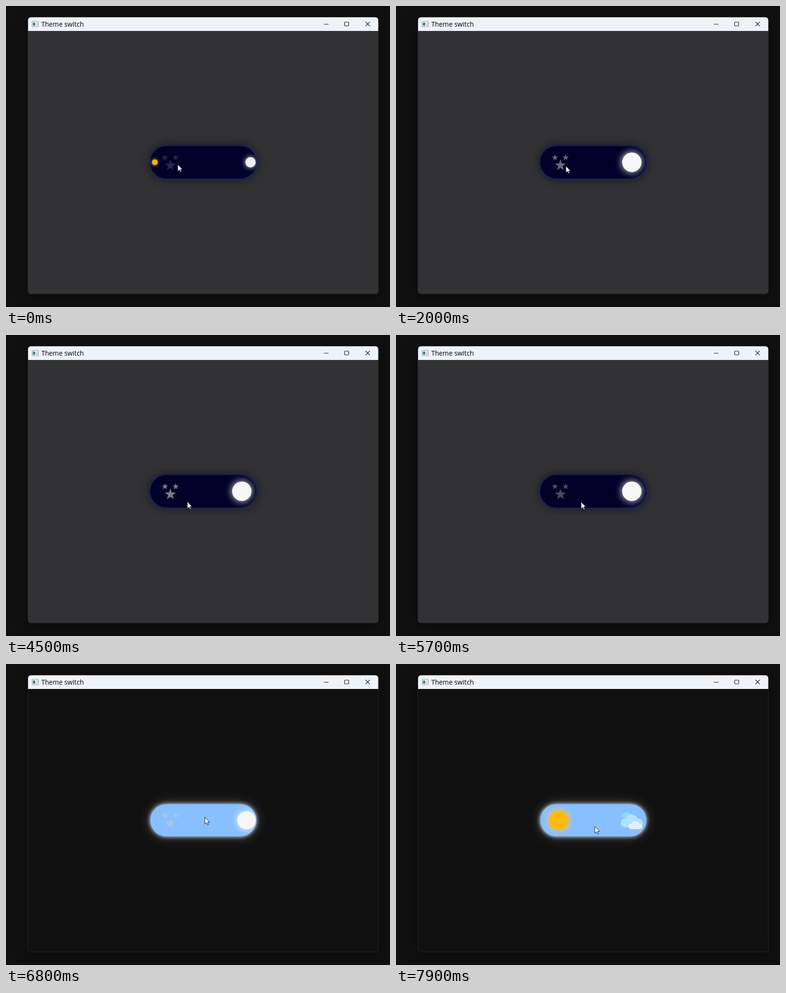
Write an HTML page with a canvas that moves like this. It is 800 px wide and 627 px high and loops after 8000 ms.

```html
<!DOCTYPE html>
<html lang="en">
<head>
<meta charset="utf-8">
<title>Theme switch</title>
<style>
  html, body { margin: 0; width: 100%; height: 100%; overflow: hidden; background: #101010; }
  canvas { display: block; }
</style>
</head>
<body>
<canvas id="stage" width="800" height="627"></canvas>
<script>
const ctx = document.getElementById('stage').getContext('2d');
const LOOP = 8000, FLIP = 6735, FADE = 450;

const clamp = v => Math.max(0, Math.min(1, v));
const smooth = v => v * v * (3 - 2 * v);
const ease = (t, start, length) => smooth(clamp((t - start) / length));

function fill(color, path, blur = 0, glow = 'transparent', dy = 0) {
  ctx.save();
  ctx.shadowBlur = blur;
  ctx.shadowColor = glow;
  ctx.shadowOffsetY = dy;
  ctx.fillStyle = color;
  ctx.fill(path);
  ctx.restore();
}

function stroke(color, width, path) {
  ctx.strokeStyle = color;
  ctx.lineWidth = width;
  ctx.stroke(path);
}

function box(x, y, w, h, r = 0) {
  const p = new Path2D();
  p.roundRect(x, y, w, h, r);
  return p;
}

function disc(x, y, r) {
  return box(x - r, y - r, 2 * r, 2 * r, r);
}

function star(x, y, r) {
  const p = new Path2D();
  for (let i = 0; i < 10; i++) {
    const a = i * Math.PI / 5, d = i % 2 ? r * 0.4 : r;
    p.lineTo(x + d * Math.sin(a), y - d * Math.cos(a));
  }
  p.closePath();
  return p;
}

// Three bumps on a rounded base; (x, y) is the lower left corner.
function cloud(x, y, w) {
  const p = box(x, y - 0.36 * w, w, 0.36 * w, 0.18 * w);
  for (let i = 0; i < 3; i++) {
    const r = w * (i === 1 ? 0.28 : 0.19);
    p.addPath(disc(x + w * (0.19 + 0.3 * i), y - r - 0.02 * w, r));
  }
  return p;
}

const frame = box(45.7, 23.5, 730, 576.3, 6);
const pill = box(300, 291.5, 222, 68, 34);
const arrow = new Path2D('M.4 .2V14.4L3.7 11.3 5.9 16 8 15.1 5.9 10.5H10.2Z');
const buttons = new Path2D('M662 38H672M749 33L758 42M758 33L749 42');

function drawWindow(night) {
  ctx.fillStyle = '#101010';
  ctx.fillRect(0, 0, 800, 627);
  fill(night ? '#323234' : '#101010', frame, 28, 'rgba(0,0,0,.4)', 6);
  stroke('#2c2c2e', 0.9, frame);
  fill('#edf3f9', box(46, 23.5, 729.5, 28.5, [6, 6, 0, 0]));

  fill('#f6f8f9', box(54, 31.5, 14, 12));
  stroke('#8d979f', 1, box(54.5, 32, 13, 11));
  fill('#4a8583', box(56, 34.5, 5, 6.5));
  fill('#c5ccd2', box(63, 34.5, 3, 6.5));

  ctx.fillStyle = '#000';
  ctx.font = '13.8px "Open Sans", "Noto Sans", sans-serif';
  ctx.fillText('Theme switch', 73.5, 42.6);
  stroke('#1c1c1c', 1.1, buttons);
  stroke('#1c1c1c', 1.2, box(705.5, 33.5, 8.5, 8, 1.5));
}

function drawPill(night) {
  if (night) {
    fill('#000028', pill, 22, 'rgba(0,0,20,.6)');
    fill('#000028', pill, 9, '#142664');
    stroke('rgba(20,40,100,.35)', 1.2, pill);
  } else {
    fill('#88bfff', pill, 28, 'rgba(255,255,255,.22)');
    fill('#88bfff', pill, 8, 'rgba(255,255,255,.85)');
    stroke('rgba(75,105,145,.5)', 1.5, pill);
  }
}

// Grows out of, or shrinks into, the end of the pill at x = edge.
function drawOrb(t, start, growing, radius, edge, inset, color, glow) {
  const p = clamp((t - start) / FADE);
  const size = growing ? smooth(p) : 1 - smooth(p);
  if (size < 0.01) return;
  const slide = growing ? smooth(clamp((p - 0.55) / 0.45)) : 1 - clamp(p / 0.14);
  const r = radius * size, x = edge + inset * slide + Math.sign(inset) * r;
  ctx.save();
  ctx.clip(pill);
  ctx.globalAlpha = 0.86 + 0.14 * size;
  fill(color, disc(x, 325.5, r), 4 + 12 * size, glow);
  ctx.restore();
}

function drawSky(t, night) {
  const twinkle = 0.45 + 0.15 * Math.cos(Math.PI * (t - 400) / 1000);
  const sunStart = night ? -288 : FLIP + 55;
  const moonStart = night ? -232 : FLIP;
  const moonEase = ease(t, moonStart, FADE);

  ctx.globalAlpha = twinkle * (night ? moonEase : 1 - moonEase) ** 1.5;
  for (const side of [-1, 0, 1]) {
    fill('#cdcfc3', side ? star(342.3 + 11.2 * side, 315.8, 6.8) : star(342.5, 332, 12.2));
  }

  ctx.globalAlpha = night ? 0 : ease(t, sunStart, FADE) ** 2;
  fill('#8dd6f8', cloud(470.5, 320, 21));
  fill('#b0e3fe', cloud(468.5, 340, 46));
  fill('#e3eff9', cloud(484.5, 344, 29));
  ctx.globalAlpha = 1;

  drawOrb(t, sunStart, !night, 20.8, 304, 14.2, '#ffb90f', 'rgba(255,205,90,.9)');
  drawOrb(t, moonStart, night, 20.2, 520, -8.5, '#f6f6f6', 'rgba(255,255,255,.9)');
}

function drawPointer(t) {
  let x = 357.5, y = 330;
  const move = (start, length, dx, dy) => {
    const k = ease(t, start, length);
    x += dx * k;
    y += dy * k;
  };
  move(980, 270, 9.5, 8);
  move(1500, 400, -13.5, -5);
  move(2380, 470, 24, 14);
  move(5400, 600, 15.5, 1);
  move(6000, 500, 21, -29);
  move(7250, 350, 0, 19);

  ctx.save();
  ctx.translate(x, y);
  fill('#fff', arrow);
  stroke('#10101c', 0.9, arrow);
  ctx.restore();
}

function draw(now) {
  const t = now % LOOP, night = t < FLIP;
  drawWindow(night);
  drawPill(night);
  drawSky(t, night);
  drawPointer(t);
  requestAnimationFrame(draw);
}
requestAnimationFrame(draw);
</script>
</body>
</html>
```
